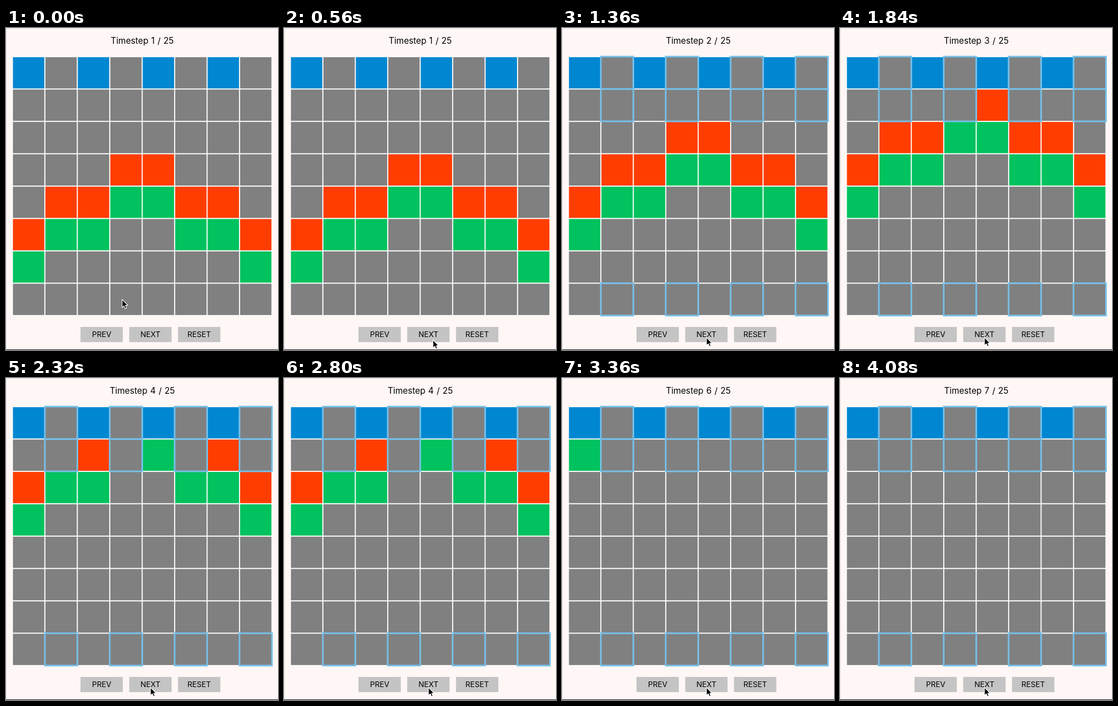
Recreate the animation shown at these times as an HTML page. Size 482 by 572 pixels, loop 4160 ms.

```html
<!DOCTYPE html>
<html lang="en">
<head>
<meta charset="utf-8">
<title>Timestep grid</title>
<style>
  html, body { margin: 0; width: 100%; height: 100%; overflow: hidden; background: #fff7f5; }
  svg { display: block; width: 482px; height: 572px; }
  text { font-family: Inter, sans-serif; text-anchor: middle; fill: #000; }
  .title { font-size: 15.2px; word-spacing: .8px; }
  .label { font-size: 13.3px; }
</style>
</head>
<body>
<svg id="stage" viewBox="0 0 482 572"></svg>
<script>
const LOOP = 4160;
const SIZE = 8, PITCH = 57.5, GAP = 1.9, CELL = PITCH - GAP, LEFT = 12.3, TOP = 51.8;
const GRAY = '#808080', BLUE = '#0087d1', RED = '#ff3d00', GREEN = '#00c25e';

// Start time of each timestep, in ms
const STEP_TIMES = [0, 1360, 1760, 2320, 2880, 3360, 3840];

// Pointer tip: [time, x, y]
const POINTER = [
  [0, 205.8, 482.2], [80, 222, 500], [160, 238, 517],
  [320, 243, 526], [400, 252, 539], [480, 261, 551],
  [560, 264, 554], [640, 260, 552], [720, 256, 549.6]
];

// Row of the red front in each column at timestep 1
const FRONT = [5, 4, 4, 3, 3, 4, 4, 5];

const stage = document.getElementById('stage');

function add(tag, attrs, text) {
  const node = document.createElementNS(stage.namespaceURI, tag);
  for (const key in attrs) node.setAttribute(key, attrs[key]);
  if (text) node.textContent = text;
  return stage.appendChild(node);
}

const rect = (x, y, width, height, fill) => add('rect', { x, y, width, height, fill });
const isBlocked = (row, col) => col % 2 === 1 && (row < 2 || row === SIZE - 1);

function cellColor(row, col, step) {
  if (row === 0) return col % 2 ? GRAY : BLUE;
  if (isBlocked(row, col)) return GRAY;
  const front = FRONT[col] - step + 1;
  return row === front ? RED : row === front + 1 ? GREEN : GRAY;
}

rect(0, 0, 482, 572, '#fff7f5');
rect(0, 0, 482, 2, '#e8eaef');
rect(0, 2, 1, 569, '#e6dfdf');
rect(0, 571, 482, 1, '#1c1a1a');
const title = add('text', { x: 241.5, y: 28, class: 'title' });

rect(LEFT - GAP / 2, TOP - GAP / 2, SIZE * PITCH, SIZE * PITCH, '#fff');
const cells = [], outlines = [];
for (let row = 0; row < SIZE; row++) {
  for (let col = 0; col < SIZE; col++) {
    const x = LEFT + col * PITCH, y = TOP + row * PITCH;
    cells.push({ row, col, node: rect(x, y, CELL, CELL, GRAY) });
  }
}
for (const { row, col } of cells) {
  if (!isBlocked(row, col)) continue;
  outlines.push(add('rect', {
    x: LEFT + col * PITCH - GAP / 2, y: TOP + row * PITCH - GAP / 2,
    width: PITCH, height: PITCH,
    fill: 'none', stroke: '#74c0ea', 'stroke-width': 2.8
  }));
}

['PREV', 'NEXT', 'RESET'].forEach((label, i) => {
  const x = 132 + i * 86.4;
  rect(x, 531, 75, 27, '#c4c4c4');
  add('text', { x: x + 37.5, y: 549.3, class: 'label' }, label);
});

const pointer = add('path', {
  d: 'M0 0V14.4L3.3 11.4L5.4 16.2L7.8 15.2L5.8 10.4H10Z',
  fill: '#000', stroke: '#fff', 'stroke-width': 1.1, 'stroke-linejoin': 'round'
});

let shown = 0;
function showStep(step) {
  if (step === shown) return;
  shown = step;
  title.textContent = `Timestep ${step} / 25`;
  for (const { row, col, node } of cells) node.setAttribute('fill', cellColor(row, col, step));
  for (const node of outlines) node.setAttribute('visibility', step > 1 ? 'visible' : 'hidden');
}

function draw(now) {
  const t = now % LOOP;
  showStep(STEP_TIMES.filter(start => start <= t).length);
  const [, x, y] = POINTER.filter(([start]) => start <= t).pop();
  pointer.setAttribute('transform', `translate(${x} ${y})`);
}

let origin;
function tick(now) {
  origin ??= now;
  draw(Math.max(0, now - origin));
  requestAnimationFrame(tick);
}
draw(0);
requestAnimationFrame(tick);
</script>
</body>
</html>
```
